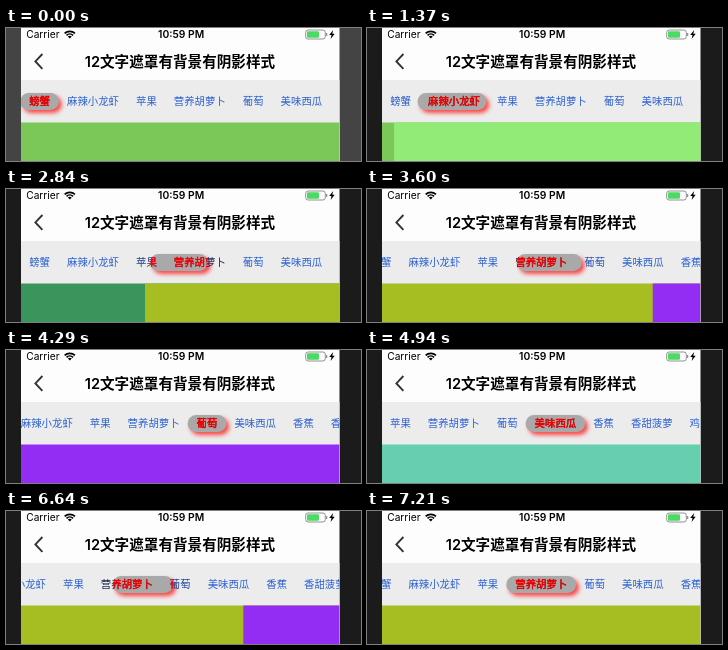
An HTML page with a canvas for the animation above (7520 ms loop, 355 by 133 pixels).

```html
<!DOCTYPE html>
<html lang="zh-CN">
<head>
<meta charset="utf-8">
<title>文字遮罩</title>
<style>
html, body { margin: 0; width: 100%; height: 100%; overflow: hidden; background: #1b1b1b; }
canvas { display: block; width: 355px; height: 133px; }
</style>
</head>
<body>
<canvas id="stage"></canvas>
<script>
const W = 355, H = 133, LOOP = 7520;
const LEFT = 15, RIGHT = 333.5, PAGE = RIGHT - LEFT, MID = (LEFT + RIGHT) / 2;
const BAR_TOP = 52, BAR_BOTTOM = 94.5;
const CHAR = 10.4, GAP = 17, PAD = 9;
const CJK = '"Noto Sans CJK SC", "Noto Sans CJK", sans-serif';
const LATIN = 'Inter, Roboto, sans-serif';

const canvas = document.getElementById('stage');
const ctx = canvas.getContext('2d');
const dpr = window.devicePixelRatio || 1;
canvas.width = W * dpr;
canvas.height = H * dpr;

const colors = ['#7bc859', '#92ea77', '#3a955c', '#a6be21', '#942df3', '#66cfaf'];
const names = ['螃蟹', '麻辣小龙虾', '苹果', '营养胡萝卜', '葡萄', '美味西瓜', '香蕉', '香甜菠萝', '鸡肉'];
let nextX = 23.2;
const tabs = names.map(name => {
  const tab = { name, x: nextX, w: name.length * CHAR };
  nextX += tab.w + GAP;
  return tab;
});

// Spans of motion: start, end, number of steps
const bursts = [
  [770, 890, 3], [1190, 1490, 6], [1790, 1970, 4], [2140, 2430, 6],
  [2730, 3370, 12], [3600, 3660, 2], [3890, 4590, 13], [4650, 5180, 10],
  [5530, 5590, 2], [5830, 6530, 13], [6590, 7210, 12]
];

const out = u => 1 - (1 - u) ** 2.4;
const smooth = u => u * u * (3 - 2 * u);
const linear = u => u;

// Pager swipes: start, end, target page, easing
const swipes = [
  [710, 890, 0.392, linear], [1130, 1480, 1, out],
  [1730, 1970, 1.527, smooth], [2080, 2430, 2, out],
  [2670, 2966, 3, smooth],
  [3540, 3660, 3.3, linear], [3830, 4180, 4, out],
  [4590, 4800, 5, smooth],
  [5470, 5590, 4.86, linear], [5796, 6130, 4, out],
  [6530, 6810, 3, out]
];

// Tab strip scrolls that centre the selected tab
const centred = i => tabs[i].x + tabs[i].w / 2 - MID;
const scrolls = [[2970, 3], [4190, 4], [4780, 5], [6130, 4], [6810, 3]]
  .map(([start, i]) => [start, start + 400, centred(i), out]);

function track(list, t) {
  let value = 0;
  for (const [start, end, target, ease] of list) {
    if (t <= start) break;
    value += (target - value) * ease(Math.min(1, (t - start) / (end - start)));
  }
  return value;
}

function snap(t) {
  let held = 0;
  const tick = Math.floor(t / 10) * 10;
  for (const [start, end, steps] of bursts) {
    if (tick < start) break;
    const gap = (end - start) / (steps - 1);
    const k = Math.min(steps - 1, Math.floor((tick + 9.99 - start) / gap));
    held = Math.floor((start + k * gap) / 10) * 10;
  }
  return held;
}

const lerp = (a, b, u) => a + (b - a) * u;

function rect(x, y, w, h, color) {
  ctx.fillStyle = color;
  ctx.fillRect(x, y, w, h);
}

function text(str, x, y, font, color, align = 'left') {
  ctx.font = font;
  ctx.fillStyle = color;
  ctx.textAlign = align;
  ctx.fillText(str, x, y);
}

function drawStatus() {
  text('Carrier', 20.2, 10.2, '400 10.2px ' + LATIN, '#000');
  text('10:59 PM', MID + 0.9, 10.2, '600 10.3px ' + LATIN, '#000', 'center');

  // Wi-Fi
  ctx.strokeStyle = '#000';
  ctx.lineWidth = 1.7;
  for (const r of [7.3, 4.6]) {
    ctx.beginPath();
    ctx.arc(63.8, 10.6, r, -Math.PI * 0.75, -Math.PI * 0.25);
    ctx.stroke();
  }
  ctx.fillStyle = '#000';
  ctx.beginPath();
  ctx.moveTo(63.8, 10.6);
  ctx.arc(63.8, 10.6, 2.8, -Math.PI * 0.75, -Math.PI * 0.25);
  ctx.fill();

  // Battery
  ctx.strokeStyle = '#777';
  ctx.lineWidth = 0.8;
  ctx.beginPath();
  ctx.roundRect(299.7, 2, 19.6, 9, 2.4);
  ctx.stroke();
  ctx.fillStyle = '#4cd964';
  ctx.beginPath();
  ctx.roundRect(301, 3.3, 12, 6.4, 1.2);
  ctx.fill();
  rect(320.2, 5, 1, 3, '#777');
  ctx.fillStyle = '#000';
  ctx.beginPath();
  [[327.2, 2], [323.2, 7.1], [325.5, 7.1], [324.6, 11], [328.7, 5.7], [326.3, 5.7]]
    .forEach(p => ctx.lineTo(...p));
  ctx.fill();
}

function drawNav() {
  ctx.strokeStyle = '#333';
  ctx.lineWidth = 1.9;
  ctx.beginPath();
  ctx.moveTo(36.4, 26);
  ctx.lineTo(29.4, 33.4);
  ctx.lineTo(36.4, 40.8);
  ctx.stroke();
  text('12文字遮罩有背景有阴影样式', MID - 0.3, 39, '600 14.6px Inter, ' + CJK, '#000', 'center');
}

function drawTabs(page, offset) {
  const i = Math.floor(page), u = page - i;
  const a = tabs[i], b = tabs[Math.min(i + 1, tabs.length - 1)];
  const x = lerp(a.x, b.x, u) - offset - PAD;
  const w = lerp(a.w, b.w, u) + PAD * 2;
  const pill = new Path2D();
  pill.roundRect(x, 65, w, 17, 8.5);

  ctx.save();
  ctx.shadowColor = 'rgba(255,0,0,0.7)';
  ctx.shadowOffsetX = 2.8 * dpr;
  ctx.shadowOffsetY = 3 * dpr;
  ctx.shadowBlur = 4.6 * dpr;
  ctx.fillStyle = '#a9a9a9';
  ctx.fill(pill);
  ctx.restore();

  const font = `400 ${CHAR}px ${CJK}`, y = 77.4;
  tabs.forEach((tab, n) => {
    const near = Math.max(0, 1 - Math.abs(page - n));
    const rgb = [42, 96, 208].map(c => Math.round(c * (1 - near)));
    text(tab.name, tab.x - offset, y, font, `rgb(${rgb})`);
  });

  ctx.save();
  ctx.clip(pill);
  ctx.strokeStyle = '#f00';
  ctx.lineWidth = 0.3;
  for (const tab of tabs) {
    text(tab.name, tab.x - offset, y, font, '#f00');
    ctx.strokeText(tab.name, tab.x - offset, y);
  }
  ctx.restore();
}

function drawPages(page) {
  const i = Math.floor(page);
  const edge = RIGHT - (page - i) * PAGE;
  rect(LEFT, BAR_BOTTOM, PAGE, H - BAR_BOTTOM, colors[i]);
  if (edge < RIGHT) rect(edge, BAR_BOTTOM, RIGHT - edge, H - BAR_BOTTOM, colors[i + 1]);
}

function draw(time) {
  const t = snap(time);
  const page = track(swipes, t);
  const shade = Math.round(lerp(68, 27, Math.min(1, Math.max(0, (t - 710) / 180))));

  ctx.setTransform(dpr, 0, 0, dpr, 0, 0);
  rect(0, 0, W, H, `rgb(${shade},${shade},${shade})`);
  ctx.save();
  ctx.beginPath();
  ctx.rect(LEFT, 0, PAGE, H);
  ctx.clip();
  // Layers overlap so that no dark seam shows between them
  rect(LEFT, 0, W, H, '#fdfdfd');
  rect(LEFT, BAR_TOP, W, H - BAR_TOP, '#ececec');
  drawStatus();
  drawNav();
  drawTabs(page, track(scrolls, t));
  drawPages(page);
  ctx.restore();
}

const began = performance.now();
function loop() {
  draw((performance.now() - began) % LOOP);
  requestAnimationFrame(loop);
}
loop();
</script>
</body>
</html>
```
